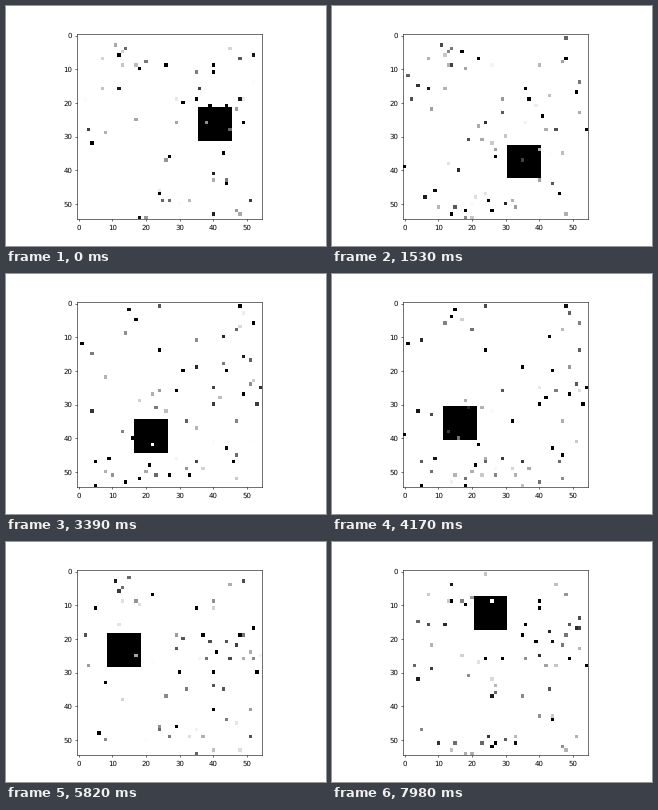
A matplotlib script that plays this animation: 320 by 240 pixels, repeating every 8 s.

```python
import numpy as np
import matplotlib.pyplot as plt
from matplotlib.animation import FuncAnimation

WIDTH, HEIGHT, DPI = 320, 240, 50
SIZE, SIDE, DOTS = 55, 10, 130
INTERVAL, FRAMES = 20, 400

# Cells that fade in and out, each with its own period, phase and strength.
rng = np.random.default_rng(4)
rows, cols = np.divmod(rng.choice(SIZE ** 2, DOTS, replace=False), SIZE)
periods = rng.uniform(90, 300, DOTS)
phases = rng.uniform(0, 2 * np.pi, DOTS)
gains = rng.uniform(0.3, 1.8, DOTS)


def scene(step):
    """White field with a black square on a circular path, cells inverted by noise."""
    angle = np.radians(step)
    left = int(SIZE / 2 + SIZE / 4 * np.cos(angle)) - SIDE // 2
    top = int(SIZE / 2 + SIZE / 4 * np.sin(angle)) - SIDE // 2
    field = np.ones((SIZE, SIZE))
    field[top:top + SIDE, left:left + SIDE] = 0
    wave = gains * np.sin(2 * np.pi * step / periods + phases)
    field[rows, cols] = np.abs(field[rows, cols] - np.clip(wave, 0, 1))
    return field


plt.rcParams["text.hinting"] = "none"
fig = plt.figure(figsize=(WIDTH / DPI, HEIGHT / DPI), dpi=DPI)
ax = fig.add_axes([71 / WIDTH, 27 / HEIGHT, 185 / WIDTH, 185 / HEIGHT])
ax.tick_params(axis="x", pad=4.7)
image = ax.imshow(scene(0), cmap="gray", vmin=0, vmax=1)


def update(i):
    image.set_data(scene((2 * i + 1) // 3))  # one step lasts 30 ms
    return [image]


anim = FuncAnimation(fig, update, frames=FRAMES, interval=INTERVAL,
                     repeat=True, repeat_delay=0)
plt.show()
```
